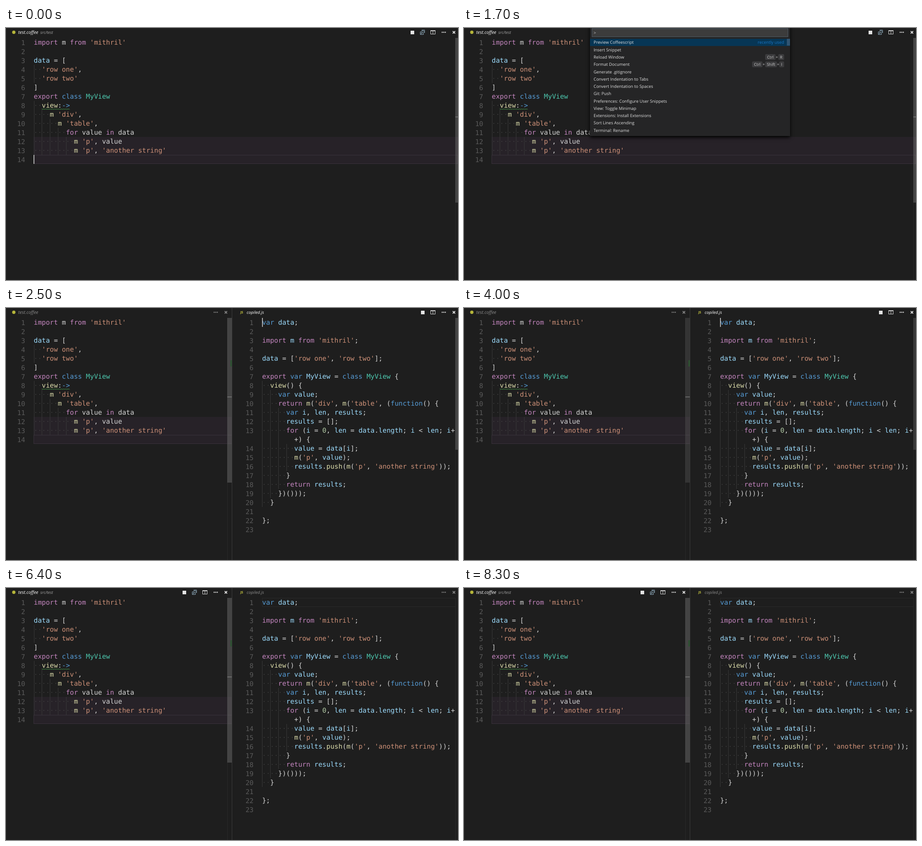
Write an HTML page with a canvas that moves like this. It is 1001 px wide and 560 px high and loops after 8800 ms.

```html
<!DOCTYPE html>
<html>
<head>
<meta charset="utf-8">
<style>
html, body { margin: 0; width: 100%; height: 100%; overflow: hidden; background: #1e1e1e }
canvas { display: block }
</style>
</head>
<body>
<canvas id="stage" width="1001" height="560"></canvas>
<script>
const ctx = document.getElementById('stage').getContext('2d');
const LOOP = 8800, CHAR = 8.893, ROW = 20, TOP = 22;
const MONO = '14.77px "DejaVu Sans Mono", monospace';
const ui = (size, style = '') => `${style} ${size}px "Open Sans", sans-serif`;

const coffee = `import m from 'mithril'

data = [
  'row one',
  'row two'
]
export class MyView
  view:->
    m 'div',
      m 'table',
        for value in data
          m 'p', value
          m 'p', 'another string'
`.split('\n');

// "~" marks the continuation of a wrapped line
const script = `var data;

import m from 'mithril';

data = ['row one', 'row two'];

export var MyView = class MyView {
  view() {
    var value;
    return m('div', m('table', (function() {
      var i, len, results;
      results = [];
      for (i = 0, len = data.length; i < len; i+
~       +) {
        value = data[i];
        m('p', value);
        results.push(m('p', 'another string'));
      }
      return results;
    })()));
  }

};
`.split('\n');

const commands = ['Preview Coffeescript', 'Insert Snippet', 'Reload Window', 'Format Document',
  'Generate .gitignore', 'Convert Indentation to Tabs', 'Convert Indentation to Spaces', 'Git: Push',
  'Preferences: Configure User Snippets', 'View: Toggle Minimap', 'Extensions: Install Extensions',
  'Sort Lines Ascending', 'Terminal: Rename'];

const TOKEN = /(?<str>'[^']*')|(?<key>\b(?:import|from|export|return|for|in)\b)|(?<decl>\b(?:class|var|function)\b|->)|(?<type>(?<=class )\w+)|(?<func>\w+(?=\()|\bm(?= ')|view)|(?<num>\d+)|(?<name>\w+)|(?<punct>[^\w\s']+?)/g;
const COLORS = { str: '#ce9178', key: '#c586c0', decl: '#569cd6', type: '#4ec9b0',
  func: '#dcdcaa', num: '#b5cea8', name: '#9cdcfe', punct: '#d4d4d4' };

function rect(x, y, w, h, color) {
  ctx.fillStyle = color;
  ctx.fillRect(x, y, w, h);
}

function text(s, x, y, color, font, align = 'left') {
  ctx.font = font;
  ctx.textAlign = align;
  ctx.fillStyle = color;
  ctx.fillText(s, x, y);
}

function box(x, y, w, h, color) {
  ctx.strokeStyle = color;
  ctx.lineWidth = 1;
  ctx.strokeRect(x + .5, y + .5, w - 1, h - 1);
}

function dot(x, y, r, color) {
  ctx.fillStyle = color;
  ctx.beginPath();
  ctx.arc(x, y, r, 0, 7);
  ctx.fill();
}

function path(color, width, ...points) {
  ctx.strokeStyle = color;
  ctx.lineWidth = width;
  ctx.beginPath();
  points.forEach(([x, y]) => ctx.lineTo(x, y));
  ctx.stroke();
}

function drawCode(lines, x, js) {
  let number = 0;
  lines.forEach((line, row) => {
    const y = TOP + row * ROW, wrapped = line[0] === '~';
    const indent = wrapped ? 6 : line.search(/\S|$/);
    if (!wrapped) text(++number, x - 19, y + 16, '#5a5a5a', MONO, 'right');
    for (let col = 0; col < indent; col++) {
      if (col % 2 === 0) rect(Math.round(x + col * CHAR), y, 1, ROW, '#383838');
      if (!wrapped) dot(x + (col + .5) * CHAR, y + 10, .9, '#454545');
    }
    for (const m of line.replace('~', ' ').matchAll(TOKEN)) {
      let kind = Object.keys(COLORS).find(k => m.groups[k] !== undefined);
      if (kind === 'name' && !js && !line.startsWith(m[0] + ' =')) kind = 'punct';
      text(m[0], x + m.index * CHAR, y + 15, COLORS[kind], MONO);
    }
  });
}

function drawSquiggle() {
  const wave = Array.from({ length: 32 }, (_, i) => [79 + i * 2, i % 2 ? 181.3 : 179.3]);
  path('#4b9e4b', 1, ...wave);
}

function drawRuler(x, height, alpha) {
  rect(x, TOP, 1, 560 - TOP, '#2a2a2a');
  rect(x, TOP, 11, height, `rgba(121,121,121,${alpha})`);
}

function drawDotsAndClose(right, color) {
  for (const d of [-26, -22.5, -19]) dot(right + d, 9.5, 1.2, color);
  path(color, 1.8, [right - 2.7, 7], [right + 2.7, 12.4]);
  path(color, 1.8, [right + 2.7, 7], [right - 2.7, 12.4]);
}

function drawSplitIcon(x) {
  box(x - 5, 5, 11, 9, '#d0d0d0');
  rect(x - 5, 5, 11, 2, '#d0d0d0');
  rect(x, 5, 1, 9, '#d0d0d0');
}

function drawPreviewIcon(x) {
  const blue = '#91aec0';
  path(blue, 1, [x - 2, 8.5], [x - 4.5, 8.5], [x - 4.5, 14.5], [x + 2.5, 14.5], [x + 2.5, 12]);
  path(blue, 1, [x - 1, 6.5], [x - 1, 4.5], [x + 5, 4.5], [x + 5, 11]);
  ctx.beginPath();
  ctx.arc(x + 1.5, 8.5, 2.5, 0, 7);
  ctx.stroke();
  path(blue, 1.4, [x - .5, 10.5], [x - 3, 13]);
}

function drawCoffeePane(width, focused, caret, alpha) {
  ctx.save();
  ctx.beginPath();
  ctx.rect(0, 0, width, 560);
  ctx.clip();
  const split = width < 1001, edge = split ? 490 : 995, right = split ? 487 : 992;
  rect(61, 242, width - 61, 60, '#272228');
  box(61, 282, width - 61, 20, '#39323b');
  drawCode(coffee, 61.5, false);
  drawSquiggle();
  if (caret) rect(61, 282, 1.7, 20, '#c8c8c8');
  drawRuler(edge, 366, alpha);
  rect(edge, 197, 11, 1.2, '#858585');
  if (split) rect(497, 116, 4, 14, '#2b522f');

  dot(17.3, 9.5, 3.7, '#b5b53a');
  text('test.coffee', 27, 13, focused ? '#fff' : '#8c8c8c', ui(10, 'italic'));
  drawDotsAndClose(right, focused ? '#e4e4e4' : '#858585');
  if (focused) {
    text('src/test', 76, 13, '#a5a5a5', ui(8.9, 'italic'));
    rect(right - 96, 6, 8, 8, '#e4e4e4');
    drawPreviewIcon(right - 70);
    drawSplitIcon(right - 47);
  }
  ctx.restore();
}

function drawScriptPane(focused, alpha) {
  rect(501, 0, 500, 560, '#1e1e1e');
  rect(500, 0, 1, 560, '#3c3c3c');
  if (!focused) box(567, 22, 429, 20, '#2a2a2a');
  drawCode(script, 567.2, true);
  if (focused) rect(567, 22, 1.7, 20, '#c8c8c8');
  drawRuler(995, 293, alpha);
  text('JS', 519, 12, '#cbcb41', ui(7, 'bold'));
  text('copiled.js', 533, 13, focused ? '#fff' : '#8c8c8c', ui(9.3, 'italic'));
  drawDotsAndClose(992, focused ? '#e4e4e4' : '#858585');
  if (focused) {
    rect(919, 6, 8, 8, '#e4e4e4');
    drawSplitIcon(945);
  }
}

function drawKey(label, x, y, w) {
  ctx.fillStyle = '#3b3b3d';
  ctx.beginPath();
  ctx.roundRect(x, y - 6.5, w, 13, 2.5);
  ctx.fill();
  text(label, x + w / 2, y + 3.2, '#ccc', ui(8.7), 'center');
}

function drawPalette(caret, slider) {
  ctx.save();
  ctx.shadowColor = '#000';
  ctx.shadowBlur = 8;
  ctx.shadowOffsetY = 3;
  rect(279, -10, 443, 250, '#252526');
  ctx.restore();
  rect(283, 1, 435, 18, '#3c3c3c');
  box(283, 1, 435, 19, '#4d5a64');
  text('>', 287, 14, '#ccc', ui(9.4));
  if (caret) rect(292, 5, 1, 11, '#ccc');

  rect(279, 24, 443, 16, '#073655');
  if (slider) rect(715, 24, 7, 15, '#315472');
  commands.forEach((name, i) => text(name, 287, 35.4 + i * 16.28, '#dedede', ui(9.4)));
  text('recently used', 709, 35.4, '#1875c4', ui(9.4), 'right');
  const plus = (x, y) => text('+', x, y + 3.2, '#ccc', ui(9), 'center');
  drawKey('Ctrl', 667, 64.5, 23);
  plus(692.8, 64.5);
  drawKey('R', 696, 64.5, 13);
  drawKey('Ctrl', 638, 80.8, 23);
  plus(663.7, 80.8);
  drawKey('Shift', 667, 80.8, 26);
  plus(695.5, 80.8);
  drawKey('I', 698, 80.8, 11);
}

function draw(t) {
  const palette = t >= 100 && t < 2200, split = t >= 2500, back = t >= 4900;
  const blink = start => Math.floor((t - start) / 500) % 2 === 0;
  rect(0, 0, 1001, 560, '#1e1e1e');
  ctx.textRendering = 'geometricPrecision';

  const caret = split ? back && t < 8300 && blink(4900) : !palette;
  const dimmed = t >= 2600 && t < 4600;
  drawCoffeePane(split ? 501 : 1001, !split || back, caret, dimmed ? .24 : .42);
  if (split) {
    const step = Math.floor((t - 3600) / 100);
    const fade = Math.min(1, Math.max(0, step / 9));
    drawScriptPane(!back, back ? 0 : .42 - .32 * fade);
  }
  if (palette) drawPalette(t < 700 || blink(1200), t >= 500);
}

const start = performance.now();
function tick() {
  draw((performance.now() - start) % LOOP);
  requestAnimationFrame(tick);
}
tick();
</script>
</body>
</html>
```
